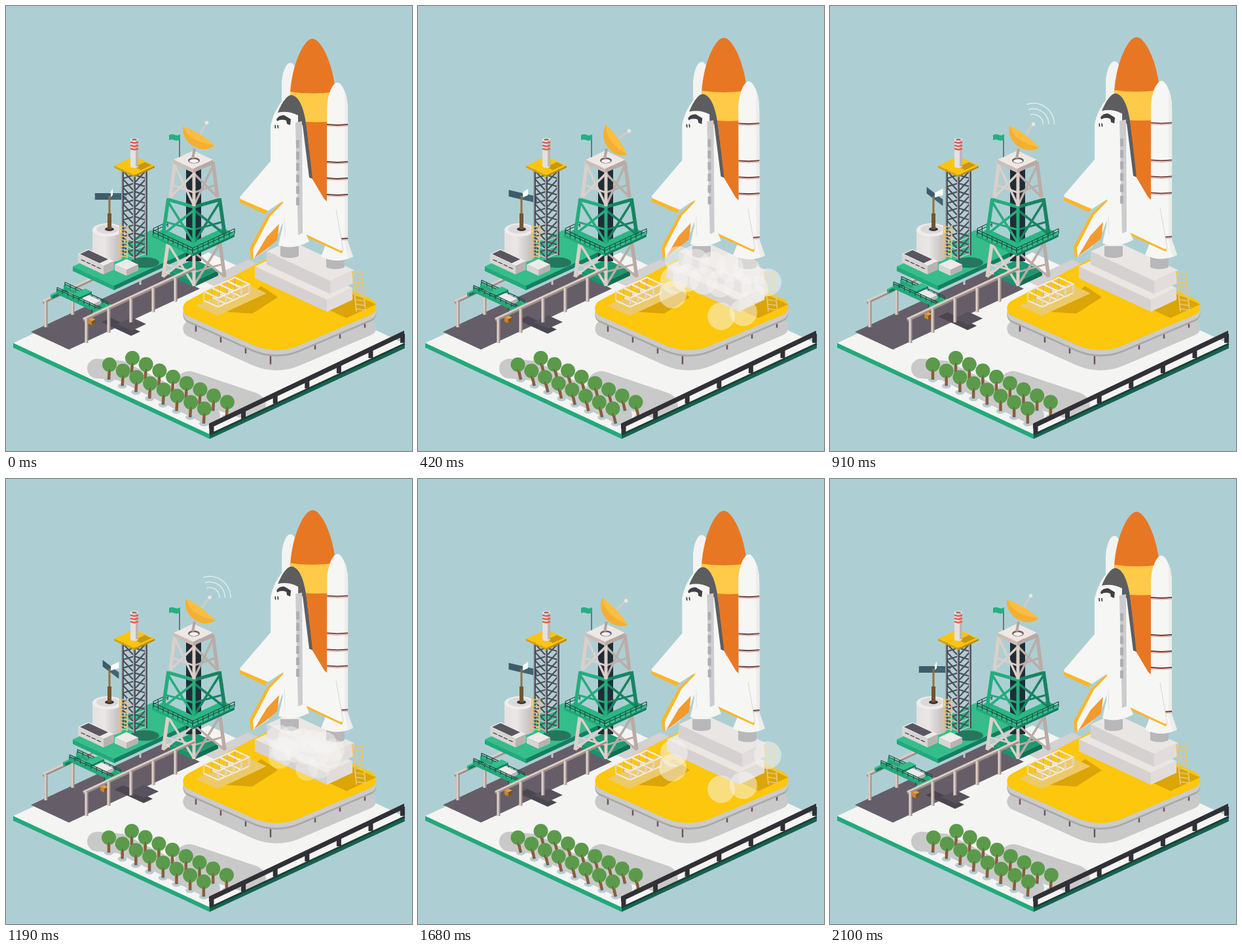
Animation, 620 px wide and 680 px high, one loop 2240 ms. Source, as an HTML page with a canvas:

```html
<!DOCTYPE html>
<html lang="en">
<head>
<meta charset="utf-8">
<title>Launch site</title>
<style>
html, body { margin: 0; width: 100%; height: 100%; overflow: hidden; background: #adcfd3; }
canvas { display: block; }
</style>
</head>
<body>
<canvas id="stage" width="620" height="680"></canvas>
<script>
const g = document.getElementById('stage').getContext('2d');
const LOOP = 2240, STEP = 70, LAST = 2100, HALF = 1050;
const SLOPE = .465;
const BEIGE = '#dccfc9', SHADE = '#a08e88', WHITE = '#f6f6f4', CORE = '#202d36', GOLD = '#fbb62b';
const LEAF = ['#35bd8b', '#22a97a', '#12805f'];
const STONE = ['#eae6e4', '#d6d1d1', '#e2dddc'];
const WALL = ['#eeeaea', '#d9d4d4', '#b9b2b3'];

const mix = (a, b, k) => a + (b - a) * k;
const clamp = k => Math.max(0, Math.min(1, k));
const wave = k => (1 - Math.cos(Math.PI * k)) / 2;

function trace(n) {
  g.beginPath();
  for (let i = 0; i < n.length; i += 2) g.lineTo(n[i], n[i + 1]);
}
function poly(color, ...n) {
  trace(n);
  g.fillStyle = color;
  g.fill();
}
function line(color, w, ...n) {
  trace(n);
  g.strokeStyle = color;
  g.lineWidth = w;
  g.stroke();
}
function rect(color, x, y, w, h) {
  g.fillStyle = color;
  g.fillRect(x, y, w, h);
}
function oval(color, x, y, rx, ry = rx) {
  g.beginPath();
  g.ellipse(x, y, rx, ry, 0, 0, 7);
  g.fillStyle = color;
  g.fill();
}
function path(color, d) {
  g.fillStyle = color;
  g.fill(new Path2D(d));
}
function moved(x, y, draw) {
  g.save();
  g.translate(x, y);
  draw();
  g.restore();
}

// Isometric shapes: x, y is the left corner, a runs down right, b runs up right
const quad = (x, y, a, b) => [
  x, y, x + a, y + a * SLOPE, x + a + b, y + (a - b) * SLOPE, x + b, y - b * SLOPE
];
function box(x, y, a, b, h, [top, left, right]) {
  const q = quad(x, y, a, b);
  poly(top, ...q);
  poly(left, x, y, q[2], q[3], q[2], q[3] + h, x, y + h);
  poly(right, q[2], q[3], q[4], q[5], q[4], q[5] + h, q[2], q[3] + h);
}
function railing(x, y, dx, dir = 1, h = 8) {
  const dy = dx * SLOPE * dir, n = Math.round(dx / 8), color = '#1d5548';
  for (const k of [h, h / 2]) line(color, 1.3, x, y - k, x + dx, y + dy - k);
  for (let i = 0; i <= n; i++) {
    const px = x + dx * i / n, py = y + dy * i / n;
    line(color, 1.3, px, py, px, py - h);
  }
}
function ladder(x, y, w, lean, h, n) {
  const color = '#e8c46d';
  for (const k of [0, w]) line(color, 2, x + k, y, x + k + lean, y + h);
  for (let i = .5; i < n; i++) {
    const px = x + lean * i / n, py = y + h * i / n;
    line(color, 1.7, px, py - 1, px + w, py + 1);
  }
}
function rail(x, y, dx, gap, posts, h) {
  for (const [color, w, off] of [[SHADE, 5, 1], [BEIGE, 3, 0]]) {
    for (let i = 0; i < posts; i++) {
      const px = x + 4 + i * gap + off, py = y - i * gap * SLOPE;
      line(color, w, px, py, px, py + h);
    }
    line(color, w, x, y + off * 2, x + dx, y - dx * SLOPE + off * 2);
  }
}

function ground() {
  box(11, 515, 300, 298, 7, ['#f4f4f3', '#22a97a', '#14634f']);
  poly('#d3d1d1', ...quad(300, 420, 20, 70));
  poly('#655e68', ...quad(38, 498, 58, 200));
  g.save();
  trace(quad(11, 515, 300, 298));
  g.clip();
  g.lineCap = 'round';
  line('#c9c9c9', 30, 139, 554, 175, 557, 312, 626);
  line('#c9c9c9', 44, 280, 580, 375, 612);
  g.restore();
}

function fan(turn) {
  const x = 22 * Math.cos(turn), y = 10 * Math.sin(turn), w = 4 + 11 * Math.sin(turn);
  const blade = (color, s) => poly(color, 160, 286, 160 + s * x, 286 + s * y, 160 + s * x, 296 + s * y, 160, 296);
  blade('#426574', 1.1);
  poly('#fff', 159, 286, 159 + w, 279, 159 + w, 289, 159, 293);
  blade('#3d5c6b', -1.1);
  line('#8f7043', 3, 158, 290, 158, 318);
  line('#74552f', 6, 158, 317, 158, 341);
}

function base(turn) {
  for (let x = 135; x < 240; x += 35) line('#c6c6c9', 3, x, 405, x, 426);
  box(102, 398, 63, 120, 7, LEAF);
  oval('#26765e', 212, 392, 22, 8);
  const skin = g.createLinearGradient(132, 0, 178, 0);
  skin.addColorStop(0, '#e4e1e0');
  skin.addColorStop(.4, '#e9e6e5');
  skin.addColorStop(1, '#bbb7b7');
  rect(skin, 132, 343, 46, 40);
  oval(skin, 155, 383, 23, 9);
  oval('#efedec', 155, 342, 23, 10);
  oval('#dcd9d8', 155, 341, 17, 7);
  oval('#353942', 158, 341, 7, 3);
  fan(turn);
}

function truss() {
  const N = 10, step = 12.7;
  for (let i = 0; i < N; i++) for (const s of [-1, 1]) {
    const y = 251 + i * step, x = 196 + 18 * s;
    line('#4b505d', 2.2, x, y, 196, y + step + 7);
    line('#4b505d', 2.2, 196, y + 7, x, y + step);
    line('#ccc4c8', 1.6, x, y + step, 196, y + step + 7);
  }
  for (const s of [-1, 0, 1]) {
    const x = 196 + 18 * s, y = 388 - 7 * Math.abs(s);
    line('#3e4350', 3.5, x, 248, x, y);
    line('#c9c2c6', 1.3, x - 1, 248, x - 1, y);
  }
  box(165, 244, 31, 31, 3, ['#fac411', '#d79f0d', '#c08a0c']);
  poly('#c9980b', ...quad(196, 246, 10, 16));
  rect('#e4e1e0', 190, 205, 12, 40);
  oval('#e4e1e0', 196, 245, 6, 2.5);
  rect('#bcb6b8', 198, 205, 4, 40);
  for (let y = 208; y < 220; y += 5) line('#e25e4d', 2.6, 190, y, 196, y + 1.5, 202, y);
  oval('#efe9e7', 196, 204, 6, 2.6);
  oval('#8c7776', 196, 204, 4, 1.6);
  ladder(174, 335, 12, -1, 50, 10);
}

function huts() {
  box(110, 379, 39, 16, 13, WALL);
  poly('#59565f', ...quad(113, 379, 30, 13));
  for (let i = 0; i < 4; i++) poly('#45434c', ...quad(114 + i * 8, 388 + i * 8 * SLOPE, 6, 1.5));
  box(166, 395, 18, 18, 9, WALL);
}

// One storey of the tower: half widths at its top and bottom, light and dark side
function storey(y, h, top, bottom, [light, dark]) {
  const foot = y + h, mid = 287;
  for (const [s, color] of [[1, dark], [-1, light]]) {
    const x = mid + s * top, fx = mid + s * bottom, hx = mix(x, fx, .65);
    line(color, 3.5, x, y + 6, mid, foot + 13);
    line(color, 3.5, mid, y + 18, fx, foot);
    line(color, 3, hx, y + h * .65, mid, y + h * .65 + 12);
    line(color, 5.5, x, y, fx, foot);
    line(color, 5, x, y + 2, mid, y + 13);
  }
  line(light, 5, mid, y + 11, mid, foot + 14);
}

function tower() {
  box(250, 404, 37, 37, 8, ['#1c9870', '#17946c', '#107052']);
  rect(CORE, 275, 244, 23, 146);
  line('#3e505a', 2, 288, 248, 288, 390);
  storey(358, 56, 39, 47, [BEIGE, '#bbaaa5']);
  poly('#2bb684', ...quad(223, 349, 62, 18));
  poly('#2bb684', ...quad(267, 369, 18, 64));
  railing(225, 348, 22, -1);
  box(223, 349, 62, 3, 4, LEAF);
  box(282, 377, 3, 64, 4, LEAF);
  storey(294, 55, 39, 47, ['#25ac7e', '#178461']);
  railing(225, 350, 60);
  railing(285, 378, 64, -1);
  storey(238, 54, 29, 36, [BEIGE, '#bbaca7']);
  box(256, 235, 30, 30, 6, ['#eee8e5', '#cbbdb8', '#baa9a4']);
  oval('#6e6264', 287, 236, 9, 4.5);
  oval('#f4f0ee', 287, 237, 7, 3);
  line('#67787b', 2, 265, 197, 265, 231);
  path('#25b083', 'M249 197Q254 195 258 197T266 196V204Q261 207 257 205T249 205Z');
}

function dish(u) {
  const lift = u < .4 ? wave(u / .4) : 1 - (u - .4) / .6;
  g.save();
  g.translate(285, 222);
  line('#b6a49f', 4, 0, 11, 3, -4);
  g.rotate(mix(31, 55, lift) * Math.PI / 180);
  g.translate(-4, -25.5);
  // The rim lies along x and the dish aims upwards
  line('#d9c9c6', 2.5, 0, 0, 0, -23);
  path('#fdbd3f', 'M-28 0Q0 -5 28 0C22 23 -18 25 -28 0Z');
  path('#f3b034', 'M28 0C22 23 -18 25 -28 0Q-8 17 28 0Z');
  oval('#eee4e2', 0, -23, 2.8);
  if (u > .07 && u < .33 || u > .67 && u < .87) {
    const rings = u > .2 && u < .33 ? 2 : 3;
    g.strokeStyle = 'rgba(245,250,250,.65)';
    g.lineWidth = 1.6;
    for (let i = 0; i < rings; i++) {
      g.beginPath();
      g.arc(0, -23, 15 + i * 8.5, -Math.PI / 2 - .95, -Math.PI / 2 + .95);
      g.stroke();
    }
  }
  g.restore();
}

function crane(slide) {
  moved(slide, -slide * .45, () => {
    poly('#4b4650', ...quad(146, 483, 45, 14));
    poly('#57525b', ...quad(170, 486, 22, 22));
    box(68, 441, 3, 23, 5, LEAF);
    box(88, 427, 68, 3, 6, LEAF);
    railing(90, 428, 66, 1, 6);
    box(112, 447, 20, 13, 5, WALL);
    box(97, 443, 10, 24, 3, LEAF);
    box(77, 434, 67, 3, 6, LEAF);
    railing(78, 436, 66, 1, 6);
    box(130, 469, 3, 29, 5, LEAF);
    line('#403c42', 1.2, 131, 464, 131, 479);
    box(125, 479, 6, 6, 6, ['#e0a040', '#c98527', '#805320']);
  });
}

function padShape(dy, color) {
  g.beginPath();
  g.moveTo(330, 422 + dy);
  g.arcTo(254, 463 + dy, 412, 534 + dy, 13);
  g.arcTo(412, 534 + dy, 585, 460 + dy, 90);
  g.arcTo(585, 460 + dy, 408, 381 + dy, 13);
  g.arcTo(408, 381 + dy, 330, 422 + dy, 20);
  g.fillStyle = color;
  g.fill();
}

function pad() {
  padShape(31, '#c9c9c9');
  for (let x = 290; x < 550; x += x === 404 ? 68 : 38) {
    const y = 534 - Math.abs(x - 412) * .437;
    line('#71525a', 2.5, x, y, x, y + 17);
  }
  padShape(10, '#a9a9ab');
  padShape(7, '#cbcbcc');
  padShape(0, '#fcc70c');
  poly('#dba407', 330, 467, 376, 470, 415, 445, 390, 428);
  poly('#dba407', ...quad(486, 461, 34, 45));
  poly('#ecca68', ...quad(289, 458, 34, 75));
  for (let i = 3; i >= 0; i--) moved(302 + i * 11.8, 436 - i * 5.2, () => {
    const q = quad(0, 0, 22, 12);
    line('#c5aa92', 1.6, 12, -5, 12, 12);
    line('#f3ece8', 2.2, ...q, 0, 0);
    line('#f3ece8', 2, 0, 14, 22, 24, 34, 18);
    for (const k of [0, 2, 4]) line('#e3d5cd', 2.2, q[k], q[k + 1], q[k], q[k + 1] + 14);
  });
}

function pedestal() {
  box(380, 398, 110, 39, 18, STONE);
  box(398, 375, 97, 36, 20, STONE);
  for (const [x, y] of [[433, 367], [503, 384]]) {
    rect('#b8b8ba', x - 14, y, 28, 14);
    oval('#b8b8ba', x, y + 14, 14, 4);
  }
  ladder(529, 405, 14, 6, 62, 9);
}

function shuttle(u) {
  const half = Math.min(u, 1 - u);
  const lean = 5.6 * Math.exp(-(((half - .26) / .09) ** 2)) - 4 * half;
  g.save();
  g.translate(470 + lean * .12, 385 - 4.7 * Math.sin(2 * Math.PI * u) ** 2);
  g.rotate(lean * .88 / 335);
  g.translate(-470, -385);

  // Far booster and tank
  path('#f3f3f2', 'M421 190V118C422 100 428 87 434 87S443 95 446 110V190Z');
  path('#e87724', 'M434 132C437 88 455 50 468 50S500 88 503 132V310H480L434 230Z');
  path('#ffca47', 'M434 131Q468 136 503 131V176Q468 180 434 174Z');

  // Near booster
  path(WHITE, 'M490 360V160C490 135 499 117 506 117S522 135 522 160V360L530 383Q506 395 481 383Z');
  path('#ededec', 'M517 130Q522 140 522 160V360L530 383L523 386L517 360Z');
  for (const y of [182, 239, 264, 289, 356]) {
    line('#6b3d38', 1.8, 490, y - 1, 506, y, 522, y - 1);
    line('#d69a88', 1, 490, y + 1, 506, y + 2, 522, y + 1);
  }

  // Wings
  poly(GOLD, 357, 293, 357, 300, 395, 318, 402, 310);
  poly(WHITE, 405, 236, 357, 292, 358, 295, 400, 313, 424, 297, 440, 260);
  poly(GOLD, 450, 344, 450, 349, 513, 378, 515, 372);
  poly(WHITE, 464, 258, 486, 295, 504, 311, 515, 373, 511, 374, 448, 344);
  line('#d6d6d6', 1, 504, 311, 515, 373);

  // Engines and body
  path(WHITE, 'M424 330L416 365Q436 374 463 360L451 330Z');
  path(WHITE, 'M404 240V184C407 164 423 136 436 136C449 138 456 160 459 185L467 264L452 350L424 356L420 300Z');
  path('#5d5d5f', 'M415 163C421 148 429 136 436 136C449 138 456 160 459 185L468 264L463 262L453 182L446 180V167Q430 159 415 163Z');
  poly('#cccccf', 442, 178, 452, 176, 453, 347, 446, 350);
  for (let y = 205; y < 300; y += 17.5) rect('#adadb3', 443, y, 5, 12);
  path('#414145', 'M413 173Q417 166 425 167L435 173L434 182L429 180L428 175Q420 172 414 176Z');
  for (const x of [411, 415]) line('#333338', 1.6, x, 182, x + .5, 187);
  line('#e0e0df', 1, 424, 300, 426, 352);

  // Tail fin
  poly(GOLD, 423, 298, 399, 320, 372, 370, 374, 387, 380, 385, 424, 310);
  poly(WHITE, 425, 299, 403, 322, 377, 372, 378, 386, 400, 371, 417, 346, 426, 320);
  poly('#f29a2e', 398, 353, 417, 333, 414, 358, 397, 372, 379, 385);
  g.restore();
}

// Puffs drift out of the middle: far ones land on the pad, near ones cover the pedestal
const PUFFS = [[389, 441, .8], [391, 419, .66], [463, 474, .66], [497, 468, .66], [534, 422, .66]];
for (let i = 0; i < 5; i++) for (const row of [0, 1])
  PUFFS.push([398 + 26 * i + 12 * row, 388 + 4 * i + 28 * row, .5]);

function smoke(u) {
  for (const [x, y, end] of PUFFS) {
    const from = end > .5 ? .1 : .04;
    if (u <= from || u >= end) continue;
    const k = clamp((u - from) / .27);
    const fade = Math.min(1, (u - from) / .05, (end - u) / .05);
    oval(`rgba(247,246,243,${.5 * fade})`, mix(mix(455, x, .5), x, k), mix(mix(405, y, .5), y, k), mix(17, 21, k));
  }
}

function trees(u) {
  const sway = 3 * Math.cos(u * 2 * Math.PI);
  for (const [x, y] of [[190, 538], [155, 548]]) for (let i = 0; i < 8; i++) {
    moved(x + i * 20.7, y + i * 9.6, () => {
      oval('#b4cdd6', 2, 23, 7, 4);
      line('#8b5d3c', 4.5, sway, 4, 2, 23);
      oval('#5b9a4b', sway, 0, 11);
      line('#79533a', 1.5, sway, 7, sway, 12);
    });
  }
}

function fence() {
  for (let i = 0; i < 7; i++) {
    const x = 314 + i * 48.6, y = 640 - i * 23.2;
    line('#303036', 7, x, y, x, y + 14);
  }
  poly('#303036', 310, 638, 608, 496, 608, 504, 310, 646);
  line('#1f3d37', 3, 311, 655, 609, 516);
}

function draw(now) {
  const t = Math.min(Math.floor(now % LOOP / STEP) * STEP, LAST);
  const u = t % HALF / HALF;
  const there = Math.min(t, LAST - t);
  rect('#adcfd3', 0, 0, 620, 680);
  ground();
  rail(56, 451, 94, 41, 2, 40);
  base(there * .065 * Math.PI / 180);
  truss();
  huts();
  tower();
  dish(u);
  crane(20 * wave(there / HALF));
  rail(118, 478, 170, 34, 5, 37);
  pad();
  pedestal();
  shuttle(u);
  smoke(u);
  trees(u);
  fence();
  requestAnimationFrame(() => draw(performance.now() - start));
}
const start = performance.now();
draw(0);
</script>
</body>
</html>
```
